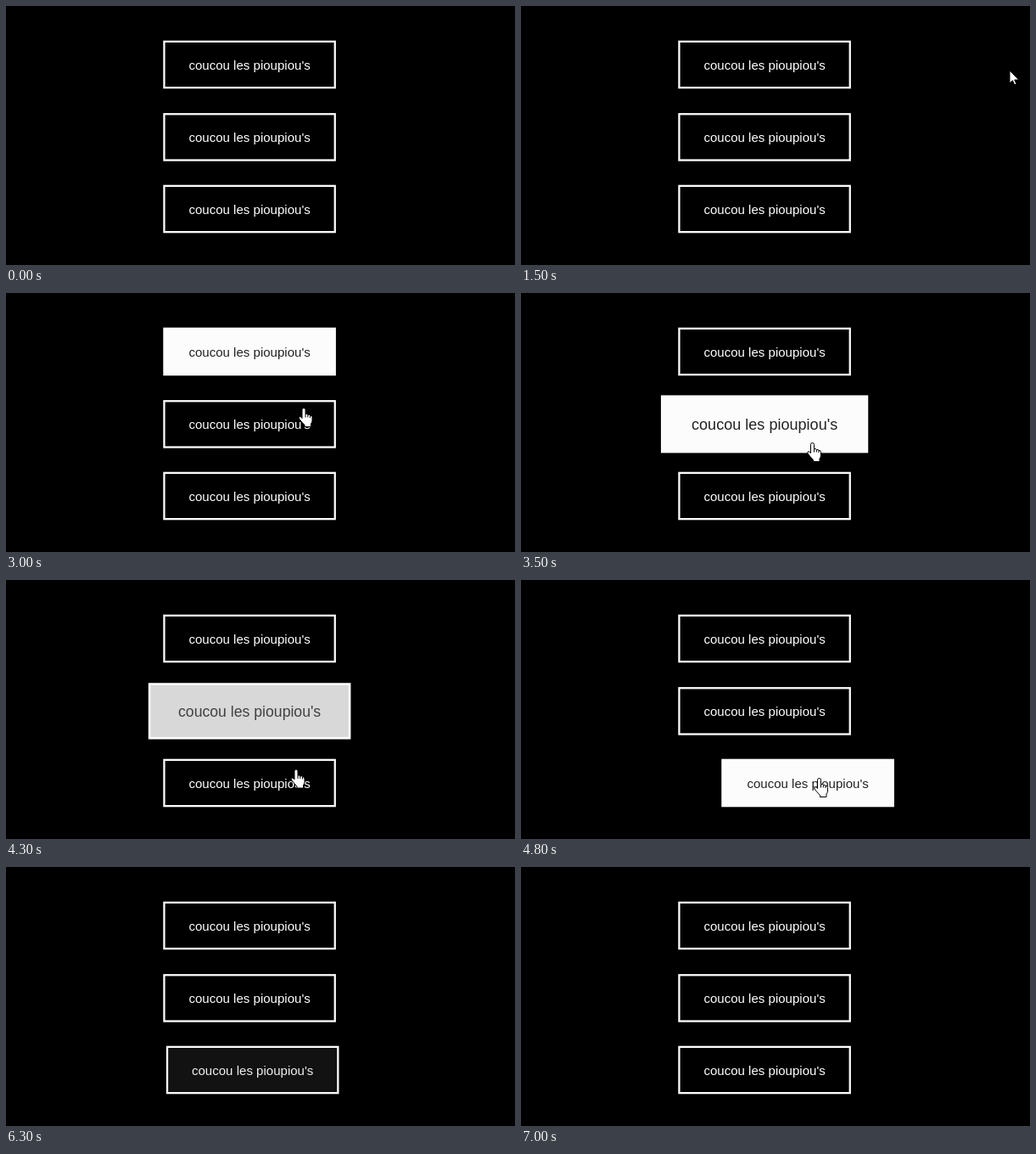
An HTML page that plays this animation: 600 px wide and 305 px high, repeating every 7300 ms.

```html
<!DOCTYPE html>
<html lang="fr">
<head>
<meta charset="utf-8">
<style>
  html, body { margin: 0; width: 100%; height: 100%; overflow: hidden; background: #000; }
  svg { display: block; width: 600px; height: 305px; }
  text { font: 15.06px "Liberation Sans", Arial, sans-serif; text-anchor: middle; }
  rect { stroke: #fdfcfd; stroke-width: 2.3; fill: #fdfcfd; }
  path { fill: #fff; stroke: #000; stroke-linejoin: round; }
</style>
</head>
<body>
<svg viewBox="0 0 600 305">
  <g id="buttons"></g>
  <g id="hand">
    <path d="M6.5 .5Q8.5 .5 8.5 2.5V7.5Q11 7 11.3 8.5Q13.5 8 14 9.3Q16.5 9 16.5 11.5V15Q16.5 17.5 15 19V22.5H7.5V20.5Q4 17 1 13Q.2 11 2 10.6Q3.5 10.8 4.5 12.5V2.5Q4.5 .5 6.5 .5Z"/>
    <path d="M8.5 7.5V11.5M11.3 8.5V11.5M14 9.3V12"/>
  </g>
  <g id="arrow">
    <path d="M0 0V15L3.5 11.8L5.7 16.8L8 15.8L5.8 11H10.8Z"/>
  </g>
</svg>
<script>
const LOOP = 7300;
const $ = id => document.getElementById(id);

// Each step: start time, hover amount of the three buttons, pointer, x, y
const steps = [
  [0, 0, 0, 0],
  [1500, 0, 0, 0, "arrow", 576, 76],
  [1800, .1, 0, 0, "hand", 367, 60],
  [2000, .875, 0, 0, "hand", 359, 57],
  [2300, 1, 0, 0, "hand", 359, 57],
  [3000, 1, 0, 0, "hand", 344.5, 135],
  [3300, .2, .71, 0, "hand", 337, 176],
  [3500, 0, 1, 0, "hand", 337, 176],
  [4300, 0, .86, 0, "hand", 335.5, 222.5],
  [4500, 0, .1, .8, "hand", 345, 233],
  [4800, 0, 0, 1, "hand", 345, 233],
  [5800, 0, 0, 1, "hand", 330, 243],
  [6000, 0, 0, .7, "arrow", 329, 291],
  [6300, 0, 0, .07],
  [6500, 0, 0, 0]
];

// Hover effects: fill only, fill and grow, fill and slide
const effects = [
  () => "",
  h => `scale(${1 + .2 * h})`,
  h => `translate(${51 * h})`
];
const centers = [69, 154.4, 239];

$("buttons").innerHTML = centers.map(() => `<g>
  <rect x="-100.65" y="-27.15" width="201.3" height="54.3"/>
  <text y="5.5">coucou les pioupiou's</text></g>`).join("");
const buttons = [...$("buttons").children];

function draw(now) {
  const t = now % LOOP;
  const [, h1, h2, h3, pointer, x, y] = steps.findLast(s => s[0] <= t);
  [h1, h2, h3].forEach((h, i) => {
    const [rect, text] = buttons[i].children;
    const shade = Math.round(255 - 221 * h);
    buttons[i].setAttribute("transform", `translate(287.1 ${centers[i]}) ${effects[i](h)}`);
    rect.setAttribute("fill-opacity", h);
    text.setAttribute("fill", `rgb(${shade},${shade},${shade})`);
  });
  for (const id of ["hand", "arrow"]) {
    $(id).style.display = id === pointer ? "" : "none";
    if (id === pointer) $(id).setAttribute("transform", `translate(${x} ${y})`);
  }
}

const start = performance.now();
function tick() {
  draw(performance.now() - start);
  requestAnimationFrame(tick);
}
tick();
</script>
</body>
</html>
```
